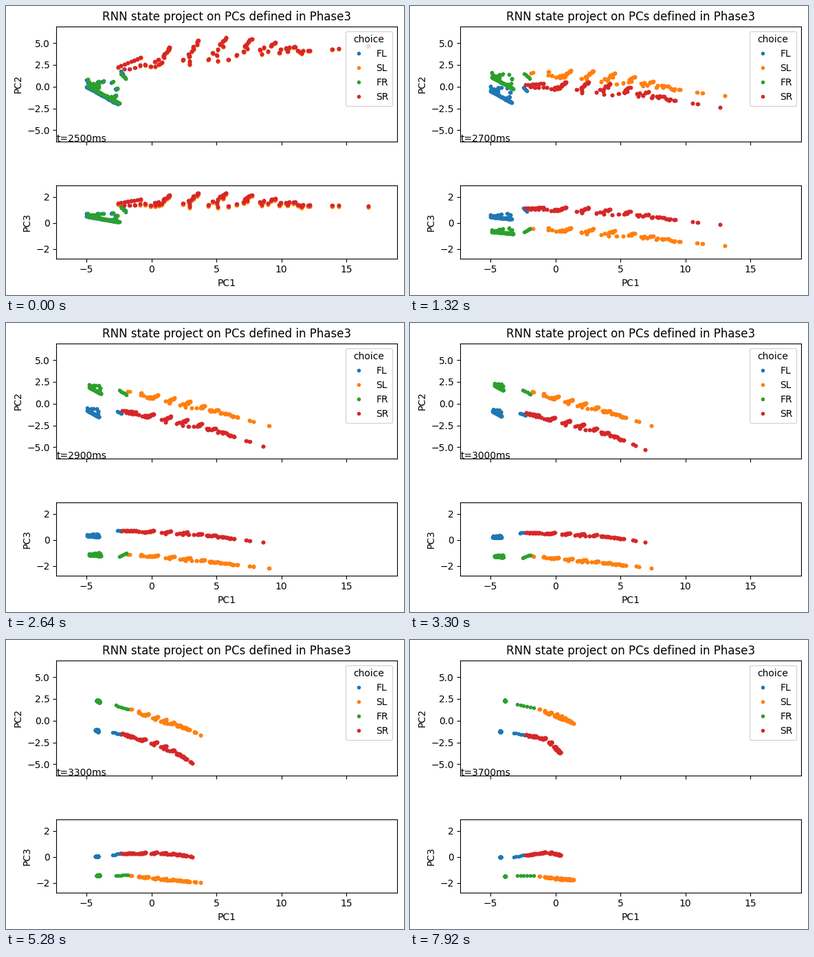
Recreate the animation shown at these times as a matplotlib script. Size 579 by 422 pixels, loop 8 s.

```python
import numpy as np
import matplotlib.pyplot as plt
from matplotlib.animation import FuncAnimation

W, H, DPI = 579, 422, 100
LOOP, TICK, HOLD = 8000, 40, 330      # ms

# Axes edges, then zero position and pixels per unit of each data axis
LEFT, RIGHT = 73.28, 569.28
X_AXIS, TOP_AXIS, LOW_AXIS = (211.7, 18.9), (117.8, 12.72), (316.8, 18.95)


def settle(u, start, end, rate, power=1):
    """Relax from start to end; u counts 200 ms of model time."""
    return end + (start - end) * np.exp(-rate * u ** power)


def trials(rng, along, across, n, da, dc):
    """Repeat each condition n times with a little scatter."""
    along, across = np.repeat(along, n), np.repeat(across, n)
    return (along + rng.uniform(-da, da, along.size),
            across + rng.uniform(-dc, dc, along.size))


def slow_cloud(rng):
    """Conditions as (e, v): place along the fan, depth below its upper edge."""
    pts = [(e, 0) for e in np.linspace(0, .09, 8)]
    pts += [(e, rng.uniform(.7, 1)) for e in np.linspace(.025, .13, 6)]
    for j in range(1, 8):
        tip = (33 + 42 * j - 48 * (j / 7) ** 3.6) / 364
        for v in np.linspace(0, 1, 13 - j) ** 1.2:
            pts.append((tip - .06 * v + v * rng.uniform(-.035, .035), v))
    pts += [(.855, 0), (.882, 0), (1, 0)]
    return trials(rng, *np.array(pts).T, 3, .0015, .02)


def fast_cloud(rng):
    """Conditions as (p, lift): place along the line, height above it."""
    p = np.concatenate([np.linspace(0, 1, 40), [0, .35, .5, .8],
                        rng.uniform(0, 1, 12)])
    lift = np.concatenate([np.zeros(40), [1, .9, 1, 1],
                           rng.uniform(.1, .7, 12)])
    return trials(rng, p, lift, 2, .01, .04)


rng = np.random.default_rng(11)
E, V = slow_cloud(rng)
P, LIFT = fast_cloud(rng)
TAIL = np.linspace(0, 1, 6)


def slow_curve(u, e, v, base, slopes, sags):
    """Arched fan that contracts and flattens into a thin curve."""
    x0, y0, z0, bend = base
    length = 364 * np.exp(-.36 * u + .17 * (1 - np.exp(-u)))
    s = 1 - np.clip(1 - e, 0, 1) ** (1 + bend * (u / 6) ** 3)
    arch = np.exp(-.8 * u) * np.clip(np.sin(np.pi * e / .77), 0, None)
    sag = (1 - np.exp(-u / 3)) * np.sin(np.pi * np.clip(s, 0, 1) ** 1.3)
    depth = v * 34 * np.exp(-((e - .36) / .3) ** 2)
    x = x0 + length * s
    y = (y0 + slopes[0] * length * s - 30 * arch - sags[0] * sag
         + depth * settle(u, 1, .15, .9))
    z = (z0 + slopes[1] * length * s - 17 * arch - sags[1] * sag
         + depth * settle(u, .6, .05, 1))
    return x, y, z


def sl(u):
    late = (E < .012) | (E > .08)
    base = (settle(u, 163, 176, 3) + 12 * (u / 6) ** 2,
            settle(u, 90, 101, 1.2), settle(u, 290, 345, 1), .9)
    slopes = settle(u, -.085, .45, .48), settle(u, .01, .1, 2)
    return slow_curve(u, E[late], V[late], base, slopes, (4, 0))


def sr(u):
    base = (settle(u, 163, 169, 2), settle(u, 89, 139, .75),
            settle(u, 288, 315, .3, 1.4), 2.6)
    slopes = (settle(u, -.085, .6, .345),
              settle(u, .01, .1, 2) - .11 * (u / 6) ** 2)
    return slow_curve(u, E, V, base, slopes, (11, 5))


def fast_curve(u, core, tail_start, tail_end):
    """Slanted line shrinking to a point, with a short tail to its right."""
    shrink = np.exp(-.4 * u ** 1.3)
    x, y, z = (settle(u, *c) for c in core)
    rise = (10 + 20 * P) * LIFT * shrink
    x = x + 46 * shrink * P
    y = y + 25 * shrink * P - rise
    z = z + 8 * np.exp(-u) * P - .42 * rise
    tail = [settle(u, *a) + (settle(u, *b) - settle(u, *a)) * TAIL
            for a, b in zip(tail_start, tail_end)]
    return [np.concatenate(pair) for pair in zip((x, y, z), tail)]


def fl(u):
    return fast_curve(
        u, [(117, 131, .003, 5), (118, 134.5, .45), (307, 317.5, .1, 2.2)],
        [(167, 148, .12, 1.5), (95, 136, .9), (292, 317, .14, 2)],
        [(174, 167, .8), (106, 139, .8), (299, 314, .1, 2)])


def fr(u):
    return fast_curve(
        u, [(119, 138, .012, 3.3), (117, 88.5, .6, 1.5), (307, 345, .9)],
        [(167, 154, .05, 2), (99, 94, .02, 3), (293, 344.5, 1.3)],
        [(174, 181, .03, 2.2), (106, 99, .04, 2.5), (301, 344.5, .8)])


def to_x(px):
    return (px - X_AXIS[0]) / X_AXIS[1]


def to_y(px, axis):
    return (axis[0] - px) / axis[1]


def make_axes(y0, y1, axis, ticks, label):
    ax = fig.add_axes([LEFT / W, 1 - y1 / H, (RIGHT - LEFT) / W, (y1 - y0) / H])
    ax.set_xlim(to_x(LEFT), to_x(RIGHT))
    ax.set_ylim(to_y(y1, axis), to_y(y0, axis))
    ax.set_xticks([-5, 0, 5, 10, 15])
    ax.set_yticks(ticks)
    ax.set_ylabel(label)
    return ax


plt.rcParams.update({"font.family": "DejaVu Sans", "font.size": 10})
fig = plt.figure(figsize=(W / DPI, H / DPI), dpi=DPI, facecolor="white")
top = make_axes(29.77, 197.77, TOP_AXIS, [-5, -2.5, 0, 2.5, 5], "PC2")
low = make_axes(262.02, 368.72, LOW_AXIS, [-2, 0, 2], "PC3")
top.tick_params(labelbottom=False)
top.set_title("RNN state project on PCs defined in Phase3")
low.set_xlabel("PC1")

groups = []
for name, path, color in (("FL", fl, "tab:blue"), ("SL", sl, "tab:orange"),
                          ("FR", fr, "tab:green"), ("SR", sr, "tab:red")):
    dots = [ax.plot([], [], ".", color=color, label=name)[0]
            for ax in (top, low)]
    groups.append((path, *dots))
top.legend(title="choice", loc="upper right")
clock = top.text(0, 0, "", transform=top.transAxes)


def update(i):
    step = (i * TICK + TICK // 2) // HOLD
    for path, upper, lower in groups:
        x, y, z = path(step / 4)
        upper.set_data(to_x(x), to_y(y, TOP_AXIS))
        lower.set_data(to_x(x), to_y(z, LOW_AXIS))
    clock.set_text(f"t={2500 + 50 * step}ms")
    return [clock] + [dot for _, *pair in groups for dot in pair]


anim = FuncAnimation(fig, update, frames=LOOP // TICK, interval=TICK,
                     repeat=True, repeat_delay=0)
plt.show()
```
